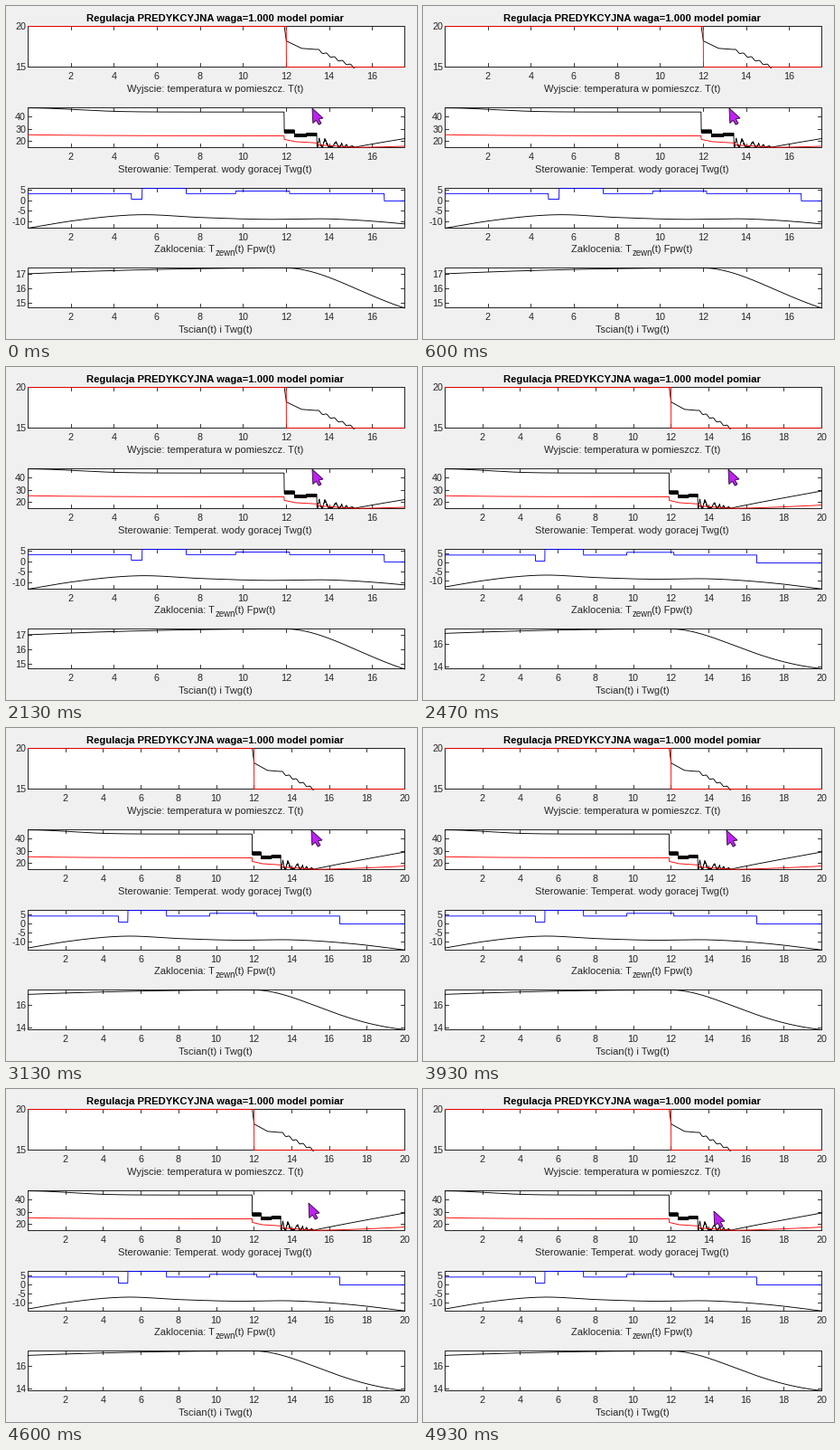
A matplotlib script for the animation above (4.99 s loop, 455 by 368 pixels).

```python
import numpy as np
import matplotlib.pyplot as plt
from matplotlib.animation import FuncAnimation
from matplotlib.patches import Polygon, Rectangle

W, H, DPI = 455, 368, 64
LOOP, STEP = 4990, 10
SWITCH = 2470            # ms at which the time axis grows
PT = 72 / DPI            # points per pixel
LEFT, RIGHT = 24, 441
DROP, CALM = 11.9, 15.15   # set point falls, control settles again
INK = "#262626"

plt.rcParams["font.family"] = "Liberation Sans"
fig = plt.figure(figsize=(W / DPI, H / DPI), dpi=DPI, facecolor="#f0f0f0")
ax = fig.add_axes([0, 0, 1, 1])


def reset_stage():
    ax.clear()
    ax.set_xlim(0, W)
    ax.set_ylim(H, 0)
    ax.axis("off")


def smooth(t, x, y):
    """Cubic Hermite curve through a few knots."""
    x, y = np.array(x), np.array(y)
    m = np.gradient(y, x)
    i = np.clip(np.searchsorted(x, t) - 1, 0, len(x) - 2)
    h = x[i + 1] - x[i]
    s = (t - x[i]) / h
    return ((1 + 2 * s) * (1 - s) ** 2 * y[i] + s * (1 - s) ** 2 * h * m[i]
            + s * s * (3 - 2 * s) * y[i + 1] + s * s * (s - 1) * h * m[i + 1])


def since(t, start):
    return np.maximum(t - start, 0)


def set_point(t):
    return np.where(t < 12, 20, 15)


def room_temp(t):
    base = np.interp(t, [DROP, 12, 12.7, 13.4, CALM], [20, 18.2, 17.3, 17.15, 15])
    ripple = 0.13 * np.sin(17 * (t - 13.4)) * ((t > 13.4) & (t < CALM))
    return base + ripple


def water_temp(t):
    heating = 43.9 + 3.3 * np.exp(-(t / 3) ** 2)
    # fast switching that draws as thick bands
    flip = 1.15 * (-1) ** np.arange(len(t))
    bands = np.select([t < 12.38, t < 12.93], [28.3, 25.0], 25.8) + flip
    u = since(t, 13.42)
    noise = np.random.default_rng(4).random(len(t))
    env = np.interp(t, [13.42, CALM], [6.5, 0.5])
    chatter = 15.4 + env * (np.sin(10 * u + np.sin(5 * u)) ** 4 + 0.4 * noise)
    rising = 15.4 + 3.19 * since(t, CALM) ** 0.937
    return np.select([t < DROP, t < 13.42, t < CALM],
                     [heating, bands, chatter], rising)


def supply_temp(t):
    before = 24.7 + 0.9 * np.exp(-t / 3)
    after = np.interp(t, [DROP, 12.4, 13.4, 13.5, CALM],
                      [21.8, 20, 19, 17.3, 15.4])
    return np.where(t < DROP, before, after + 0.25 * since(t, CALM) ** 1.5)


def outdoor_temp(t):
    return smooth(t, [0, 2, 5.2, 8, 11, 14, 17.5, 20],
                  [-13, -9.6, -6.6, -7.9, -8.8, -8.6, -11, -14.1])


def flow(t):
    steps = np.array([.58, .14, 1, .58, .78, .58, 0])
    edges = [4.8, 5.3, 7.35, 9.65, 12.15, 16.55]
    return steps[np.searchsorted(edges, t, side="right")]


def wall_temp(t):
    warming = 0.4 * (since(12, t) / 12) ** 2
    cooling = 4 * (1 - np.exp(-(since(t, 12) / 5.04) ** 1.85))
    return 17.42 - warming - cooling


def text(x, y, s, size=11.1, ha="center", color=INK, **kw):
    ax.text(x, y, s, fontsize=size * PT, ha=ha, va="baseline", color=color, **kw)


def stroke(x, y, color):
    ax.plot(x, y, color=color, lw=0.9 * PT, solid_joinstyle="round")


def panel(top, bottom, tmax, lo, hi, yticks, curves):
    """Boxed plot with inward ticks on all sides."""
    def px(t):
        return LEFT + t * (RIGHT - LEFT) / tmax

    def py(v):
        return bottom - (v - lo) * (bottom - top) / (hi - lo)

    ax.add_patch(Rectangle((LEFT, top), RIGHT - LEFT, bottom - top,
                           fc="white", ec=INK, lw=PT))
    for t in range(2, int(tmax) + 1, 2):
        x = px(t)
        stroke([x, x], [bottom, bottom - 4], INK)
        stroke([x, x], [top, top + 4], INK)
        text(x, bottom + 14, str(t), 10.7)
    for v in yticks:
        y = py(v)
        stroke([LEFT, LEFT + 4], [y, y], INK)
        stroke([RIGHT, RIGHT - 4], [y, y], INK)
        text(LEFT - 2, y + 4, str(v), 10.7, "right")
    t = np.arange(0, tmax + 0.005, 0.01)
    for f, color in curves:
        # curves run through pixel centres, like the snapped box
        stroke(px(t) + 0.5, py(f(t)) + 0.5, color)


def scene(tmax, flow_top, out_low, wall_low, wall_ticks):
    """Render the four plots once and return the pixels."""
    reset_stage()
    panel(22, 67, tmax, 15, 20, [15, 20],
          [(room_temp, "black"), (set_point, "red")])
    panel(112, 156, tmax, 15.2, 47.3, [20, 30, 40],
          [(water_temp, "black"), (supply_temp, "red")])
    panel(201, 245, tmax, out_low, flow_top, [-10, -5, 0, 5],
          [(lambda t: flow_top * flow(t), "blue"), (outdoor_temp, "black")])
    panel(289, 333, tmax, wall_low, 17.42, wall_ticks, [(wall_temp, "black")])

    text(231.5, 17, "Regulacja PREDYKCYJNA waga=1.000 model pomiar", 11.2,
         color="black", weight="bold")
    text(231.5, 95, "Wyjscie: temperatura w pomieszcz. T(t)")
    text(231.5, 184, "Sterowanie: Temperat. wody goracej Twg(t)")
    text(164, 272.5, "Zaklocenia: T", ha="left")
    text(231.5, 276.5, "zewn", 9.6, "left")
    text(253, 272.5, "(t) Fpw(t)", ha="left")
    text(231.5, 361, "Tscian(t) i Twg(t)")
    fig.canvas.draw()
    return np.array(fig.canvas.buffer_rgba())


short = scene(17.5, 6, -13, 14.68, [15, 16, 17])
full = scene(20, 7.4, -14.2, 13.8, [14, 16])

reset_stage()
backdrop = fig.figimage(short, zorder=-1)
ARROW = np.array([(0, 0), (0.8, 16.5), (4.3, 13.2), (7.3, 18.2),
                  (10, 16.6), (7.3, 11.8), (12, 11)])
cursor = Polygon(ARROW, fc="#c020f5", ec="#30103c", lw=0.9 * PT)
ax.add_patch(cursor)


def cursor_tip(ms):
    if ms < SWITCH:
        return 339, 113
    keys = [3870, 3930, 4400, 4600, 4930]
    return (np.interp(ms, keys, [338, 336, 336, 335, 322]),
            np.interp(ms, keys, [113, 113, 121, 126, 135]))


def update(i):
    # the pointer moves 15 times a second, on whole pixels
    tick = (i * STEP + 5) * 15 // 1000
    ms = round(tick * 1000 / 15, -1)
    backdrop.set_data(short if ms < SWITCH else full)
    cursor.set_xy(ARROW + np.round(cursor_tip(ms)))
    return backdrop, cursor


anim = FuncAnimation(fig, update, frames=LOOP // STEP, interval=STEP,
                     repeat=True, repeat_delay=0, blit=False)
plt.show()
```
